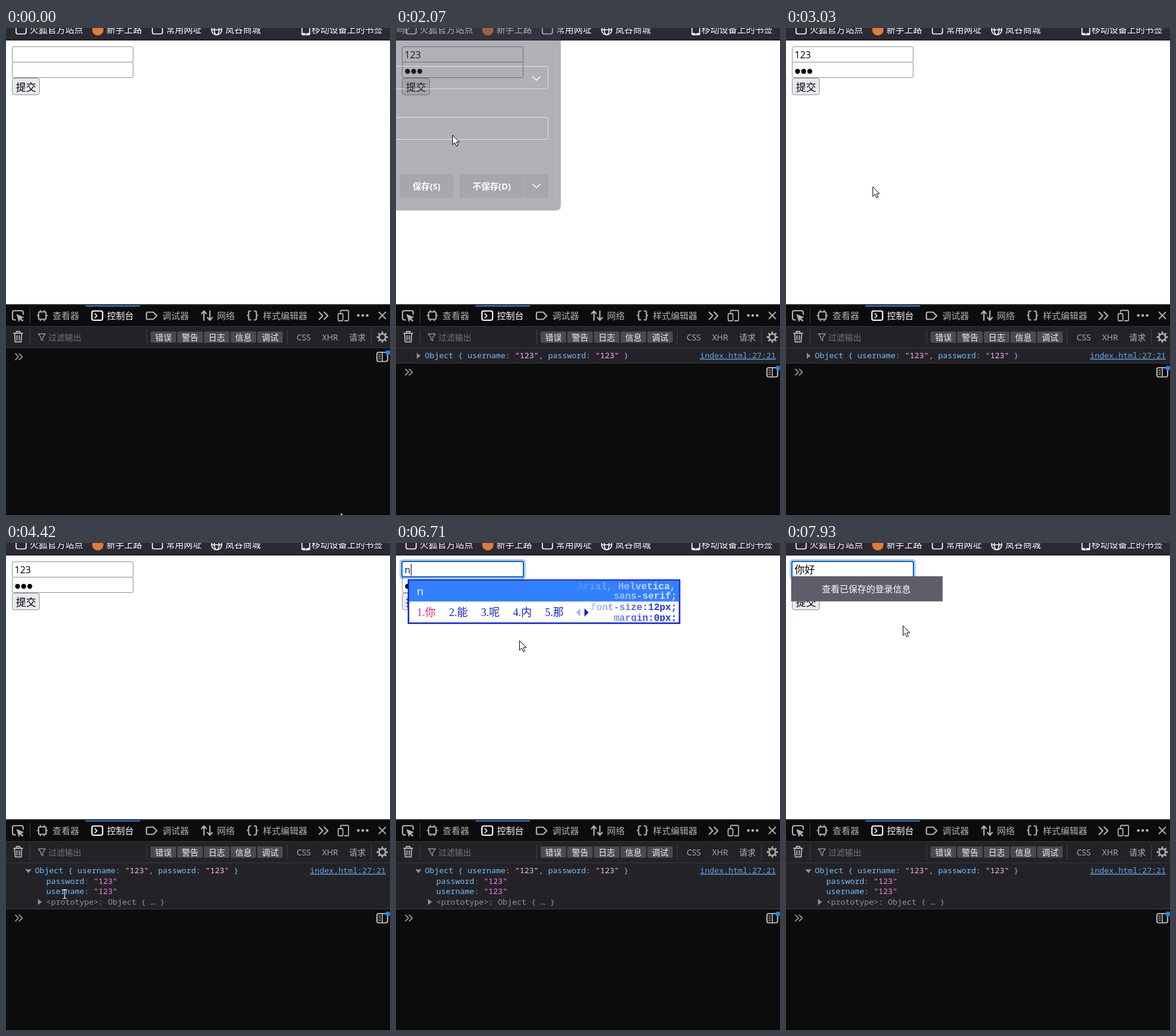
These frames come from a looping animation (648x820 px, 8 s). An HTML page:

```html
<!DOCTYPE html>
<html lang="zh">
<head>
<meta charset="utf-8">
<style>
html, body { margin: 0; width: 100%; height: 100%; overflow: hidden; background: #fff; }
svg { display: block; width: 648px; height: 820px; }
text { font-family: "Open Sans", "Noto Sans CJK SC", "Noto Sans CJK", sans-serif; white-space: pre; }
.ui { font-size: 15px; }
.small { font-size: 13.9px; }
.field { font-size: 16px; }
.mono text { font: 13.33px "Noto Sans Mono", "DejaVu Sans Mono", monospace; }
.icon { fill: none; stroke: #b1b1b3; stroke-width: 2.2; stroke-linecap: round; stroke-linejoin: round; }
.ime { font: 18px "Liberation Serif", "Noto Sans CJK SC", "Noto Sans CJK", serif; font-weight: 300; }
.decor text { font: bold 16.2px "Liberation Mono", "Noto Sans Mono", monospace; }
.key { fill: #75bfff; }
.str { fill: #ff7de9; }
.soft { fill: #f6b8f1; }
.mid { text-anchor: middle; }
.end { text-anchor: end; }
</style>
</head>
<body>
<svg viewBox="0 0 648 820">
  <defs>
    <linearGradient id="fade" gradientUnits="userSpaceOnUse" x1="300" x2="440" y1="0" y2="0">
      <stop stop-color="#fff" stop-opacity=".08"/><stop offset="1" stop-color="#fff"/>
    </linearGradient>
    <mask id="fadeMask" maskUnits="userSpaceOnUse" x="290" y="60" width="190" height="72">
      <rect x="290" y="60" width="190" height="72" fill="url(#fade)"/>
    </mask>
  </defs>
  <rect width="648" height="820" fill="#fff"/>

  <!-- bookmark bar -->
  <rect width="648" height="20" fill="#2b2a33"/>
  <rect y="20" width="648" height="1" fill="#0c0c0d"/>
  <g class="icon" style="stroke:#fbfbfe;stroke-width:1.7">
    <rect x="17" y="-7" width="17" height="17" rx="3"/>
    <rect x="247" y="-7" width="17" height="17" rx="3"/>
    <circle cx="355.500" cy="3" r="8.500"/>
    <ellipse cx="355.500" cy="3" rx="4" ry="8.500"/>
    <path d="M347 3h17"/>
    <rect x="499.500" y="-8" width="13" height="19.500" rx="2.500"/>
    <path d="M500 10h4M508 10h4" stroke-width="3"/>
  </g>
  <circle cx="155" cy="3" r="9.500" fill="#e07b3c"/>
  <g class="ui" fill="#fbfbfe">
    <text x="40" y="8">火狐官方站点</text><text x="169.500" y="8">新手上路</text>
    <text x="270" y="8">常用网址</text><text x="370" y="8">岚谷商城</text>
    <text x="515.500" y="8">移动设备上的书签</text>
  </g>

  <!-- form -->
  <g id="inputs"></g>
  <rect id="submit" x="10.500" y="84.500" width="46" height="28" rx="4" fill="#e9e9ed" stroke="#8f8f9d"/>
  <text class="mid" x="33.700" y="105.500" font-size="17">提交</text>
  <g id="focus" fill="none">
    <rect x="7.500" width="210" height="31" rx="4" stroke="#0060df" stroke-opacity=".3" stroke-width="3"/>
    <rect x="10" y="2.500" width="205" height="26" rx="2" stroke="#0060df" stroke-width="2"/>
  </g>
  <rect id="selection" x="14" y="35" width="29" height="20" fill="#0078d7"/>
  <text id="user" class="field" x="14.500" y="50.700"></text>
  <g id="dots"></g>
  <rect id="caret" width="1" height="20" fill="#000"/>

  <!-- devtools -->
  <rect y="465" width="648" height="355" fill="#0c0c0d"/>
  <rect y="465" width="648" height="1.500" fill="#2c3530"/>
  <rect y="502" width="648" height="37" fill="#38383d"/>
  <rect y="503" width="648" height="35" fill="#232327"/>
  <rect x="134" y="467" width="92" height="2" fill="#2c7fd8"/>
  <path d="M40.500 471v26M40.500 508v25M237.500 508v25M474.500 508v25M616.500 508v25" stroke="#414146"/>
  <g class="icon">
    <path d="M16 491.500h-2a3 3 0 0 1-3-3v-9.500a3 3 0 0 1 3-3h12a3 3 0 0 1 3 3v3"/>
    <path d="M18.500 482.500l11 4.500-4.500 1.500 4 4-1.500 1.500-4-4-1.500 4z" fill="#b1b1b3" stroke-width="1"/>
    <rect x="55" y="478" width="12.500" height="12.500" rx="2"/>
    <path d="M58 475.500v2M64.500 475.500v2M58 491v2M64.500 491v2M52.500 484.200h2M68 484.200h2" stroke-width="1.800"/>
    <path d="M237 480.500a2 2 0 0 1 2-2h9.500l6 6-6 6h-9.500a2 2 0 0 1-2-2z"/>
    <path d="M334 492v-15M330 481l4-4.500 4 4.500M344 476.500v15M340 487.500l4 4.500 4-4.500"/>
    <path d="M413 476.500h-1.500q-2 0-2 2v3q0 2.500-2 2.500 2 0 2 2.500v3q0 2 2 2h1.500M419 476.500h1.500q2 0 2 2v3q0 2.500 2 2.500-2 0-2 2.500v3q0 2-2 2h-1.500"/>
    <path d="M528.500 478.500l6 6-6 6M537 478.500l6 6-6 6"/>
    <path d="M564.500 479v-2a1.500 1.500 0 0 1 1.500-1.500h10.500a1.500 1.500 0 0 1 1.500 1.500v14.500a1.500 1.500 0 0 1-1.500 1.500h-5" stroke-width="1.800"/>
    <rect x="560.500" y="481" width="8" height="12" rx="1.500" stroke-width="1.800"/>
    <path d="M629.500 478.500l11 11M640.500 478.500l-11 11" stroke-width="1.800"/>
    <path d="M13 514h15M17.500 513.500v-2.500h6v2.500M14.500 514.500l1 14h10l1-14M18.500 518v7M22.500 518v7" stroke-width="1.900"/>
    <path d="M54.500 515h12l-4.500 6v5.500l-3-2v-3.500z" stroke="#939395" stroke-width="1.300"/>
    <circle cx="635" cy="520.500" r="5.500" stroke-width="2.600"/>
    <g id="gear" stroke-width="2.800"></g>
  </g>
  <g fill="#b1b1b3"><circle cx="594.500" cy="484" r="2.300"/><circle cx="602" cy="484" r="2.300"/><circle cx="609.500" cy="484" r="2.300"/></g>
  <g class="icon" style="stroke:#fff">
    <rect x="145" y="476.500" width="18" height="15.500" rx="3"/><path d="M150 481l3.500 3.500-3.500 3.500" stroke-width="1.700"/>
  </g>
  <g class="ui" fill="#b1b1b3">
    <text x="78.500" y="489.800">查看器</text><text x="170.500" y="489.800" fill="#fff">控制台</text>
    <text x="263.800" y="489.800">调试器</text><text x="356" y="489.800">网络</text><text x="433.500" y="489.800">样式编辑器</text>
  </g>
  <g class="small" fill="#b1b1b3">
    <text x="71.500" y="526" fill="#737378">过滤输出</text>
    <g id="badges"></g>
    <text class="mid" x="502.500" y="525.500">CSS</text><text class="mid" x="547" y="525.500">XHR</text><text x="579" y="526">请求</text>
  </g>

  <!-- console -->
  <g id="log" class="mono">
    <rect id="logLine" y="539" width="648" fill="#38383d"/>
    <rect id="logBack" y="539" width="648" fill="#232327"/>
    <text x="48.700" y="556" fill="#b1b1b3"><tspan class="key">Object { username</tspan>: <tspan class="soft">"123"</tspan>, <tspan class="key">password</tspan>: <tspan class="soft">"123"</tspan><tspan class="key"> }</tspan></text>
    <text class="end" x="641" y="556" fill="#62a5e6" text-decoration="underline">index.html:27:21</text>
    <path id="twisty" fill="#8f8f92"/>
    <g id="details" fill="#939395">
      <text x="68" y="574"><tspan class="key">password</tspan>: <tspan class="str">"123"</tspan></text>
      <text x="68" y="591"><tspan class="key">username</tspan>: <tspan class="str">"123"</tspan></text>
      <text x="68" y="609">&lt;prototype&gt;: Object { … }</text>
      <path d="M54 599.500v10l6.500-5z"/>
    </g>
  </g>
  <g id="prompt" class="icon">
    <path d="M16 548.500l5 5-5 5M22.500 548.500l5 5-5 5" stroke="#939395" stroke-width="1.800"/>
    <rect x="626" y="546" width="18" height="15.500" rx="3"/>
    <path d="M635 546v15" stroke-width="1.800"/><path d="M629 550h3M629 553.500h3M629 557h3" stroke-width="1.300"/>
    <circle cx="644.500" cy="546.500" r="4" fill="#1c84ea" stroke="none"/>
  </g>
  <rect y="818" width="648" height="2" fill="#050505"/>

  <!-- save prompt -->
  <g id="popup">
    <path d="M0 0h280v300q0 9-9 9H0z" fill="#000" fill-opacity=".12"/>
    <path d="M0 0h278v298q0 9-9 9H0z" fill="#42414d"/>
    <text class="ui end" x="23" y="8" fill="#fbfbfe" font-weight="700">吗?</text>
    <g fill="none" stroke="#bfbfc9">
      <rect x="-20" y="64.500" width="276.500" height="38" rx="4"/><rect x="-20" y="150.500" width="276.500" height="37" rx="4"/>
    </g>
    <rect id="save" x="6" y="246" width="91" height="40" rx="4"/>
    <path id="skip" d="M111 246h105v40H111a4 4 0 0 1-4-4v-32a4 4 0 0 1 4-4z"/>
    <path d="M217 246h36a4 4 0 0 1 4 4v32a4 4 0 0 1-4 4h-36z" fill="#2b2a33"/>
    <path d="M230.500 82l6.500 6 6.500-6M230.500 263l6.500 6 6.500-6" class="icon" style="stroke:#fbfbfe;stroke-width:1.700"/>
    <g class="mid" font-size="14.600" font-weight="700" fill="#fbfbfe">
      <text id="saveText" x="51.500" y="271.500">保存(S)</text><text x="161.500" y="271.500">不保存(D)</text>
    </g>
  </g>

  <!-- saved login list -->
  <g id="dropdown">
    <rect x="8" y="56" width="257" height="43" fill="#000" fill-opacity=".2"/>
    <rect x="9" y="56" width="255" height="42" fill="#5f5e68"/>
    <text class="ui mid" x="135.500" y="83" fill="#fbfbfe">查看已保存的登录信息</text>
  </g>

  <!-- input method -->
  <g id="ime">
    <rect id="imeBox" x="21" y="62.500" height="72.500" fill="#fff" stroke="#0a1cf0" stroke-width="2.500"/>
    <rect id="imeHead" x="22" y="63.500" height="35" fill="#3380ff"/>
    <g id="decor"><g class="decor end" mask="url(#fadeMask)">
      <g fill="#d3e5ff"><text x="472" y="78">Arial, Helvetica,</text><text x="474" y="94">sans-serif;</text></g>
      <g fill="#1f33f0"><text x="474" y="113">font-size:12px;</text><text x="474" y="130.500">margin:0px;</text></g>
    </g></g>
    <text id="pinyin" x="35" y="87.500" fill="#fff" font-size="19"></text>
    <text id="words" class="ime" y="122.500"></text>
    <g id="arrows"><path d="M311 110v14l-7-7z" fill="#a9b8ff"/><path d="M318 110v14l7-7z" fill="#0a1cf0"/></g>
  </g>
  <g id="cursor">
    <path id="arrow" d="M.5.500v16l3.700-3.500 2.600 6 2.700-1.200-2.600-5.800h5z" fill="#fff" stroke="#000" stroke-linejoin="round"/>
    <path id="beam" d="M-3.500-7.500h2.500l1 1 1-1H3.500M0-6.500V6.500M-3.500 7.500h2.500l1-1 1 1H3.500" fill="none" stroke-width="1.200"/>
  </g>
</svg>
<script>
const LOOP = 8000;
const $ = id => document.getElementById(id);
const set = (id, attrs) => { for (const k in attrs) $(id).setAttribute(k, attrs[k]); };
const show = (id, on) => { $(id).style.display = on ? '' : 'none'; };
const within = (t, a, b) => t >= a && t < b;

// last value whose start time has passed
const stepAt = (t, steps) => steps.reduce((v, [from, next]) => t >= from ? next : v, steps[0][1]);

const path = [
  [0, 564, 815], [60, 564, 815], [350, 300, 430], [670, 92, 46], [1290, 92, 46], [1450, 85, 73],
  [1690, 85, 73], [1910, 38, 104], [2000, 55, 135], [2070, 95, 180], [2140, 100, 188], [2450, 172, 264],
  [2780, 150, 266], [3030, 146, 267], [3100, 144, 272], [3350, 95, 490], [3500, 70, 598], [3630, 88, 568],
  [3730, 84, 570], [4190, 49, 561], [4340, 49, 561], [4420, 99, 591], [4500, 102, 591], [5100, 140, 226],
  [5410, 110, 46], [5900, 110, 46], [6100, 208, 164], [7720, 208, 164], [7930, 197, 139], [LOOP, 197, 139]
];
function cursorAt(t) {
  const i = Math.max(1, path.findIndex(p => p[0] > t));
  const [a, ax, ay] = path[i - 1], [b, bx, by] = path[i];
  const k = (t - a) / (b - a);
  return [ax + (bx - ax) * k, ay + (by - ay) * k];
}

const typed = [[0, ''], [1130, '1'], [1210, '12'], [1290, '123'], [5960, ''], [6710, 'n'], [6790, 'ni'],
  [7030, "ni'h"], [7190, "ni'ha"], [7260, "ni'hao"], [7340, '你好']];
const words = [[0, '你能呢内那'], [6790, '你呢泥拟尼'], [7030, '你好 你好吗 你好啊 你会 你还好']];
const focusSteps = [[0, -1], [900, 0], [1450, 1], [1910, -1], [5650, 0]];
const caretOn = [[0, 0], [900, 1], [1910, 0], [5650, 1], [5790, 0], [5960, 1], [6460, 0], [6710, 1], [7790, 0]];
const dotCount = [[0, 0], [1530, 1], [1610, 2], [1690, 3]];
const popupAlpha = [[0, 0], [2070, .41], [2150, .9], [2230, 1], [2870, .5], [2950, 0]];

$('inputs').innerHTML = [[31.5, 26], [57.5, 26]].map(([y, h], i) =>
  `<rect id="input${i}" x="10.5" y="${y}" width="204" height="${h}" rx="2.5" fill="#fff"/>`).join('');
$('dots').innerHTML = [0, 1, 2].map(i => `<circle id="dot${i}" cx="${19.5 + i * 10.3}" cy="73" r="4.2"/>`).join('');
$('badges').innerHTML = ['错误', '警告', '日志', '信息', '调试'].map((s, i) =>
  `<rect x="${244 + 45 * i}" y="511" width="43" height="19" rx="2" fill="#4a4a4f"/>
   <text class="mid" x="${265.7 + 45 * i}" y="526" fill="#f0f0f4">${s}</text>`).join('');
$('gear').innerHTML = [...Array(8).keys()].map(i =>
  `<path d="M635 513v-.800" transform="rotate(${i * 45} 635 520.500)"/>`).join('');

function drawIme(t, text) {
  const on = within(t, 6710, 7340);
  show('ime', on);
  if (!on) return;
  const raw = stepAt(t, words);
  const list = raw.includes(' ') ? raw.split(' ') : [...raw];
  let x = 35.5;
  $('words').innerHTML = list.map((w, i) => {
    const span = `<tspan x="${x}" fill="${i ? '#1420d8' : '#e0247c'}">${i + 1}.${w}</tspan>`;
    x += 36 + 18 * w.length;
    return span;
  }).join('');
  const grow = (x - 305.5) * .98;
  set('imeBox', { width: 457.5 + grow });
  set('imeHead', { width: 455.5 + grow });
  for (const id of ['decor', 'arrows']) set(id, { transform: `translate(${grow})` });
  $('pinyin').textContent = text;
}

function drawForm(t, mx, my) {
  const focus = stepAt(t, focusSteps), text = stepAt(t, typed), selected = within(t, 5790, 5960);
  for (const i of [0, 1]) {
    const hover = mx > 10 && mx < 215 && my > 31 + 27 * i && my < 57 + 27 * i;
    set('input' + i, { stroke: hover ? '#676774' : '#8f8f9d' });
  }
  const pressed = within(t, 1910, 2000);
  set('submit', { fill: pressed ? '#b1b1b9' : '#e9e9ed' });
  show('focus', focus >= 0);
  set('focus', { transform: `translate(0 ${focus ? 55.5 : 28.5})` });
  show('selection', selected);
  $('user').textContent = text;
  set('user', {
    fill: selected ? '#fff' : within(t, 6710, 7340) ? '#10106c' : '#000',
    style: text === '你好' ? 'font-size:17px' : ''
  });
  const count = stepAt(t, dotCount);
  for (let i = 0; i < 3; i++) show('dot' + i, i < count);
  show('caret', stepAt(t, caretOn));
  const end = focus === 1 ? 15 + count * 10.3 : 15 + $('user').getComputedTextLength();
  set('caret', { x: Math.round(end), y: focus === 1 ? 61 : 35 });
  drawIme(t, text);
  show('dropdown', within(t, 5650, 6710) || t >= 7340);
}

function drawConsole(t) {
  const open = t >= 4340, height = t < 2000 ? 0 : open ? 78 : 26;
  show('log', height);
  show('details', open);
  set('logLine', { height });
  set('logBack', { height: Math.max(0, height - 1) });
  set('twisty', { d: open ? 'M32.500 549.500h10.500l-5.250 6.500z' : 'M35 547v10l6.500-5z' });
  set('prompt', { transform: `translate(0 ${height})` });
  return 539 + height;
}

function drawPopup(t, mx, my) {
  const ready = t >= 2150;
  set('popup', { opacity: stepAt(t, popupAlpha) });
  set('save', { fill: ready ? '#00ddff' : '#2b2a33' });
  set('saveText', { fill: ready ? '#2b2a33' : '#fbfbfe' });
  set('skip', { fill: mx > 107 && mx < 216 && my > 246 && my < 286 ? '#52525e' : '#2b2a33' });
}

function render(t) {
  const [mx, my] = cursorAt(t);
  drawForm(t, mx, my);
  drawPopup(t, mx, my);
  const logEnd = drawConsole(t);
  const overInput = mx > 10 && mx < 215 && my > 31 && my < 84;
  const overLog = t > 3000 && mx > 30 && my > 539 && my < logEnd + 28;
  const beam = overInput || overLog;
  show('arrow', !beam);
  show('beam', beam);
  set('beam', { stroke: overLog ? '#fff' : '#000' });
  set('cursor', { transform: `translate(${Math.round(mx)} ${Math.round(my)})` });
}

const start = performance.now();
function tick() {
  render((performance.now() - start) % LOOP);
  requestAnimationFrame(tick);
}
tick();
</script>
</body>
</html>
```
